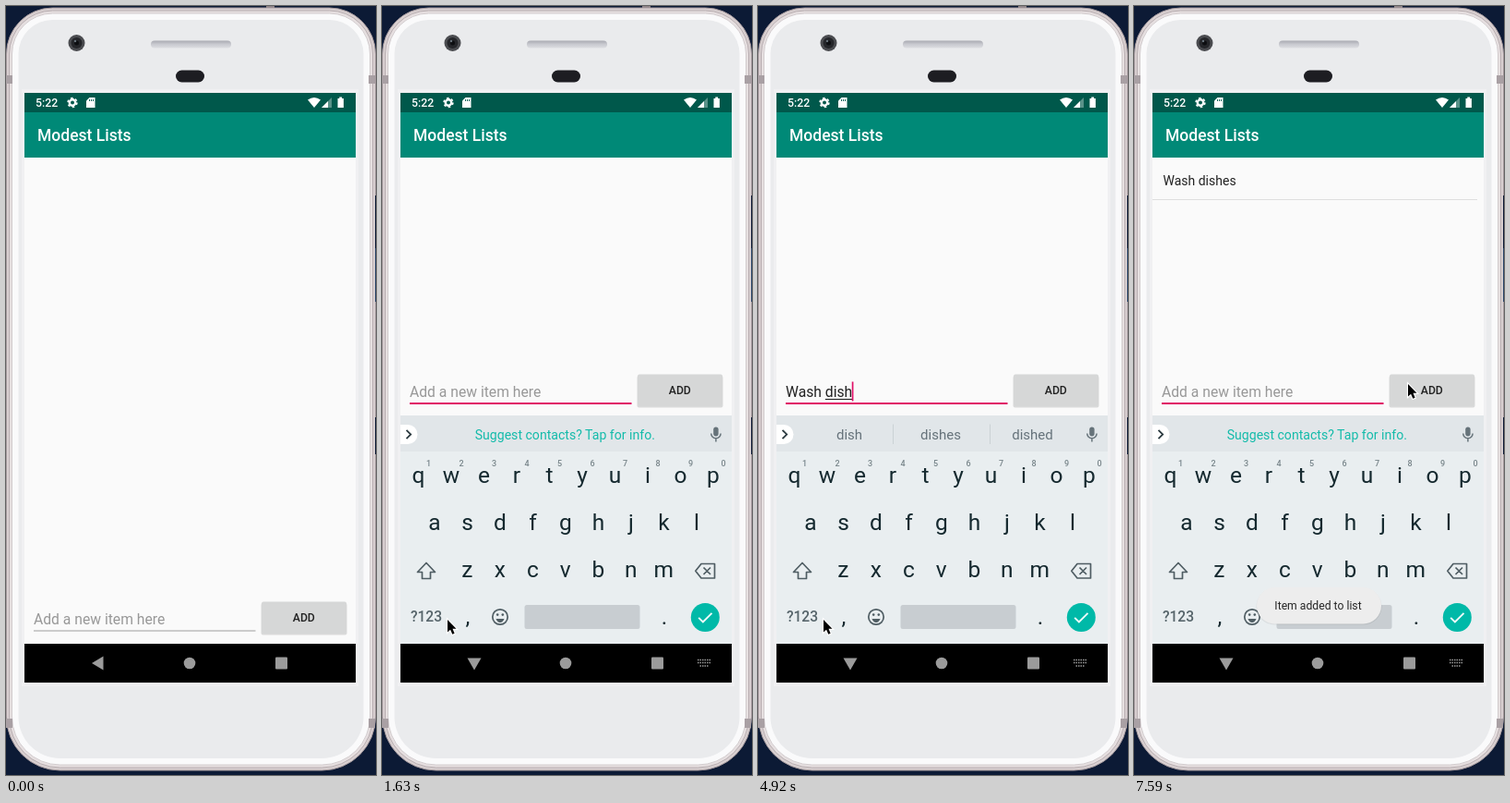
Write an HTML page that moves like this. It is 401 px wide and 832 px high and loops after 8000 ms.

```html
<!DOCTYPE html>
<html lang="en">
<head>
<meta charset="utf-8">
<title>To-do app</title>
<style>
  html, body { margin: 0; width: 100%; height: 100%; overflow: hidden; background: #0c1a35; }
  svg { display: block; width: 100%; height: 100%; }
  text { font-family: Roboto, "Noto Sans", sans-serif; white-space: pre; }
  .mid { text-anchor: middle; }
  .medium { font-weight: 500; }
  .key { font-size: 24.5px; fill: #15292f; }
  .digit { font-size: 9px; fill: #78858a; font-weight: 500; }
  .word { font-size: 15px; fill: #65727a; }
  .field { font-size: 15.7px; }
  .icon { fill: none; stroke: #4f5d63; stroke-width: 1.7; stroke-linejoin: round; }
</style>
</head>
<body>
<svg viewBox="0 0 401 832" preserveAspectRatio="none">
  <defs>
    <clipPath id="screen"><rect x="20" y="94" width="359" height="638"/></clipPath>
    <linearGradient id="slot" x2="0" y2="1">
      <stop offset="0" stop-color="#a9aab2"/><stop offset=".5" stop-color="#c9cad0"/><stop offset="1" stop-color="#dcdde1"/>
    </linearGradient>
  </defs>

  <!-- phone body -->
  <rect width="401" height="832" fill="#0c1a35"/>
  <rect x="282" y="0" width="9" height="6" fill="#8e8488"/>
  <g id="shell"></g>
  <path d="M0 75h7v9H0zM393 75h7v9h-7zM0 771h7v10H0zM393 771h7v10h-7z" fill="#a9a0a4"/>
  <path d="M17 90H382V736H17z" fill="#f0f0f2"/>
  <path d="M400 205h1v57h-1zM400 445h1v40h-1z" fill="#0c1a35"/>
  <path d="M400 262h1v58h-1z" fill="#294469"/>
  <circle cx="76.500" cy="40" r="9" fill="#4b4c50"/>
  <circle cx="76.500" cy="40" r="6" fill="#25262a"/>
  <circle cx="76.500" cy="40" r="2.500" fill="#0d0e11"/>
  <circle cx="75" cy="38" r="1.200" fill="#68727a"/>
  <rect x="157" y="37.500" width="87" height="8" rx="4" fill="url(#slot)"/>
  <rect x="184" y="69.500" width="31" height="13" rx="6.500" fill="#1d1d22"/>

  <g clip-path="url(#screen)">
    <rect x="20" y="94" width="359" height="638" fill="#fafafa"/>
    <rect x="20" y="94" width="359" height="21" fill="#00584b"/>
    <rect x="20" y="115" width="359" height="49" fill="#008977"/>
    <text class="medium" x="34" y="146" font-size="17.5" fill="#fff">Modest Lists</text>

    <!-- status bar -->
    <text class="medium" x="32" y="109" font-size="12.3" fill="#fff">5:22</text>
    <circle cx="72" cy="104.500" r="3.200" fill="none" stroke="#fff" stroke-width="2.400"/>
    <circle cx="72" cy="104.500" r="4.900" fill="none" stroke="#fff" stroke-width="1.600" stroke-dasharray="2.566"/>
    <path d="M90.500 99H96.500V110H87V102.500z" fill="#fff"/>
    <path d="M90.500 101v2M92.500 101v2M94.500 101v2" stroke="#00584b" stroke-width=".9"/>
    <path d="M327 101.500Q334 96.500 341 101.500L334 110z" fill="#fff"/>
    <path d="M353 99V110H342z" fill="#fff" opacity=".35"/>
    <path d="M349 103V110H342z" fill="#fff"/>
    <path d="M359.500 100h1.800v-1.500h2.800v1.500h1.800v10h-6.400z" fill="#fff"/>

    <g id="item">
      <text x="31.500" y="193.500" font-size="14" fill="#222">Wash dishes</text>
      <path d="M20 209.500H372" stroke="#dedede"/>
    </g>

    <!-- entry row, drawn at its raised place -->
    <g id="entry">
      <text id="hint" class="field" x="30" y="423" fill="#989898">Add a new item here</text>
      <text class="field" x="30" y="423" fill="#222"><tspan id="done"></tspan><tspan id="typing"></tspan></text>
      <path id="spell" stroke="#222" stroke-width="1.100"/>
      <path id="line" d="M30 430H270.500"/>
      <rect id="caret" y="406.500" width="1.700" height="21" fill="#e01067"/>
      <rect x="276.500" y="400" width="93" height="34.500" rx="2" fill="#000" opacity=".13"/>
      <rect x="277" y="398.500" width="92" height="34.500" rx="2" fill="#d6d7d7"/>
      <text class="mid medium" x="322.800" y="420" font-size="12.2" fill="#222">ADD</text>
    </g>

    <rect x="20" y="690" width="359" height="42" fill="#000"/>

    <g id="keyboard">
      <rect x="20" y="443" width="359" height="247" fill="#e9eef0"/>
      <rect x="20" y="443" width="359" height="39" fill="#e1e6e9"/>
      <path d="M20 453H28a10.500 10.500 0 0 1 0 21H20z" fill="#fff"/>
      <path d="M26.500 458.800l4.700 4.700-4.700 4.700" fill="none" stroke="#2c3b41" stroke-width="1.800"/>
      <text id="tip" class="mid" x="198.300" y="468.500" font-size="14.1" fill="#14bbaa">Suggest contacts? Tap for info.</text>
      <g id="words">
        <path d="M146.500 452.500V474M251.500 452.500V474" stroke="#cbd2d5"/>
        <text class="word mid" x="99" y="469"></text>
        <text class="word mid" x="198" y="469"></text>
        <text class="word mid" x="297.500" y="469"></text>
      </g>
      <rect x="359.200" y="455.500" width="5.400" height="10" rx="2.700" fill="#66737a"/>
      <path d="M356.700 462.500a5.200 5.200 0 0 0 10.400 0M361.900 467.700V471.500" fill="none" stroke="#66737a" stroke-width="1.500"/>
      <g id="keys"></g>
      <path class="icon" d="M48 602.500L57.500 612.500H52.500V619.500H43.500V612.500H38.500z"/>
      <path class="icon" d="M346 603.500H360.500V619H346L339.800 611.300zM348.500 607.500l7.500 7.500M356 607.500l-7.500 7.500"/>
      <text class="mid medium" x="48" y="666" font-size="15.6" fill="#56646a">?123</text>
      <text class="mid key" x="93" y="669">,</text>
      <circle class="icon" cx="128" cy="661" r="8.200"/>
      <path d="M123.500 663h9q-1.500 4-4.500 4t-4.500-4z" fill="#4f5d63"/>
      <circle cx="125.200" cy="658.600" r="1.300" fill="#4f5d63"/>
      <circle cx="130.800" cy="658.600" r="1.300" fill="#4f5d63"/>
      <rect x="154.500" y="648" width="125" height="26" rx="2.500" fill="#c8cdd1"/>
      <text class="mid key" x="306" y="669">.</text>
      <circle cx="350.300" cy="661.500" r="15.500" fill="#00b9a8"/>
      <path d="M343.200 661.800l4.700 4.700 9.600-9.600" fill="none" stroke="#fff" stroke-width="1.900"/>
    </g>

    <!-- navigation bar -->
    <g fill="#9b9b9b">
      <path id="back" d="M93 711L105.500 703.500V718.500z"/>
      <path id="hide" d="M92.500 705.500H107.500L100 718.500z"/>
      <circle cx="199" cy="711" r="6.300"/>
      <rect x="292" y="704.500" width="13" height="13" rx="1"/>
      <path id="switch" d="M342 707.500H356M342 710.500H356M344.500 714H353.500" stroke="#9b9b9b" stroke-width="1.500" stroke-dasharray="1.500 1"/>
    </g>

    <g id="toast">
      <rect x="132.500" y="630" width="136" height="39.500" rx="19.700" fill="#000" opacity=".07"/>
      <rect x="133" y="629" width="135" height="39.500" rx="19.700" fill="#ededed"/>
      <text class="mid" x="199.500" y="653" font-size="12.2" fill="#262626">Item added to list</text>
    </g>
  </g>

  <path id="pointer" d="M0 0V13.500L3.100 10.700L5.300 15.800L7.600 14.800L5.500 9.800H9.500z" stroke="#fff" stroke-width="2.200" paint-order="stroke"/>
</svg>
<script>
const LOOP = 8000;
const RAISE = 246;
const $ = id => document.getElementById(id);
const show = (id, on) => $(id).setAttribute("visibility", on ? "visible" : "hidden");

// Each track lists [start, ...values]; a value holds until the next start.
const typed = [
  [0, "", ""],
  [2380, "", "W"], [2830, "", "Wa"], [2970, "", "Was"],
  [3270, "", "Wash", "Wash", "Washed", "Washing"],
  [3420, "Wash ", "", "the", "and", "it"],
  [3870, "Wash ", "d", "d", "do", "done"],
  [4170, "Wash ", "di", "di", "do", "did"],
  [4620, "Wash ", "dis", "dis", "dish", "discuss"],
  [4920, "Wash ", "dish", "dish", "dishes", "dished"],
  [5220, "Wash ", "dishe", "dishe", "dishes", "dishwashing"],
  [5370, "Wash ", "dishes", "dishes", "fishes", "dished"],
  [7000, "", ""]
];
const caretOn = [
  [0, false], [1040, true], [1630, false], [2080, true],
  [5970, false], [6410, true], [6850, false], [7000, true], [7590, false]
];
const pointer = [
  [150, 128, 635], [300, 104, 647], [450, 85, 657], [600, 75, 662], [750, 71, 664],
  [5670, 104, 545], [5820, 158, 388], [5970, 205, 391], [6110, 246, 398],
  [6260, 273, 405], [6410, 287, 409], [6560, 294, 410], [6710, 297, 409]
];
// opacity, distance below the resting place
const keyboard = [[0, 0, 58], [1040, .4, 24], [1190, .81, 7.5], [1330, 1, 0]];
const toast = [[0, 0], [7150, .2], [7290, .55], [7440, .85], [7590, 1]];

const at = (track, t) => track.findLast(step => step[0] <= t)?.slice(1);

// One layer of the phone, inset from its outline; the lower corners are rounder.
function addShell(inset, fill, stroke) {
  const top = 50 - inset, bottom = 58 - inset;
  const w = 400 - 2 * inset, h = 825 - 2 * inset;
  const d = `M${inset + .5} ${2 + inset + top}a${top} ${top} 0 0 1 ${top} ${-top}h${w - 2 * top}` +
    `a${top} ${top} 0 0 1 ${top} ${top}v${h - top - bottom}a${bottom} ${bottom} 0 0 1 ${-bottom} ${bottom}` +
    `h${2 * bottom - w}a${bottom} ${bottom} 0 0 1 ${-bottom} ${-bottom}z`;
  $("shell").insertAdjacentHTML("beforeend", `<path d="${d}" fill="${fill}" stroke="${stroke}"/>`);
}
addShell(0, "#d9d0d1", "#a4999d");
addShell(3, "#e6dfe0", "#b8aeb1");
addShell(6, "#fafafb", "#d3cdcf");
addShell(13, "#eaebed", "none");

function addRow(letters, x, y, digits) {
  [...letters].forEach((letter, i) => {
    const cx = x + i * 35.5;
    let row = `<text class="key mid" x="${cx}" y="${y}">${letter}</text>`;
    if (digits) row += `<text class="digit mid" x="${cx + 11}" y="498">${(i + 1) % 10}</text>`;
    $("keys").insertAdjacentHTML("beforeend", row);
  });
}
addRow("qwertyuiop", 39.5, 516, true);
addRow("asdfghjkl", 57, 567);
addRow("zxcvbnm", 92.3, 618);

const setText = (el, text) => { if (el.textContent !== text) el.textContent = text; };
const widthOf = el => el.textContent ? el.getComputedTextLength() : 0;

function drawEntry(t, focused) {
  const [done, typing, ...words] = at(typed, t);
  setText($("done"), done);
  setText($("typing"), typing);
  const start = 30 + widthOf($("done"));
  const end = start + widthOf($("typing"));
  $("spell").setAttribute("d", typing ? `M${start} 425.500H${end}` : "");
  $("caret").setAttribute("x", Math.max(30, end - .5));
  show("caret", at(caretOn, t)[0]);
  show("hint", !done && !typing);
  show("tip", !words.length);
  show("words", words.length);
  document.querySelectorAll(".word").forEach((el, i) => setText(el, words[i] || ""));

  $("entry").setAttribute("transform", `translate(0 ${focused ? 0 : RAISE})`);
  $("line").setAttribute("stroke", focused ? "#e01067" : "#a0a0a0");
  $("line").setAttribute("stroke-width", focused ? 1.8 : 1.2);
}

function draw(t) {
  const [opacity, drop] = at(keyboard, t);
  const focused = opacity > 0;
  drawEntry(t, focused);
  $("keyboard").setAttribute("opacity", opacity);
  $("keyboard").setAttribute("transform", `translate(0 ${drop})`);
  show("back", !focused);
  show("hide", focused);
  show("switch", focused);
  show("item", t >= 7000);
  $("toast").setAttribute("opacity", at(toast, t)[0]);
  const tip = at(pointer, t);
  show("pointer", tip);
  if (tip) $("pointer").setAttribute("transform", `translate(${tip})`);
}

const begin = performance.now();
function tick() {
  draw((performance.now() - begin) % LOOP);
  requestAnimationFrame(tick);
}
tick();
</script>
</body>
</html>
```
